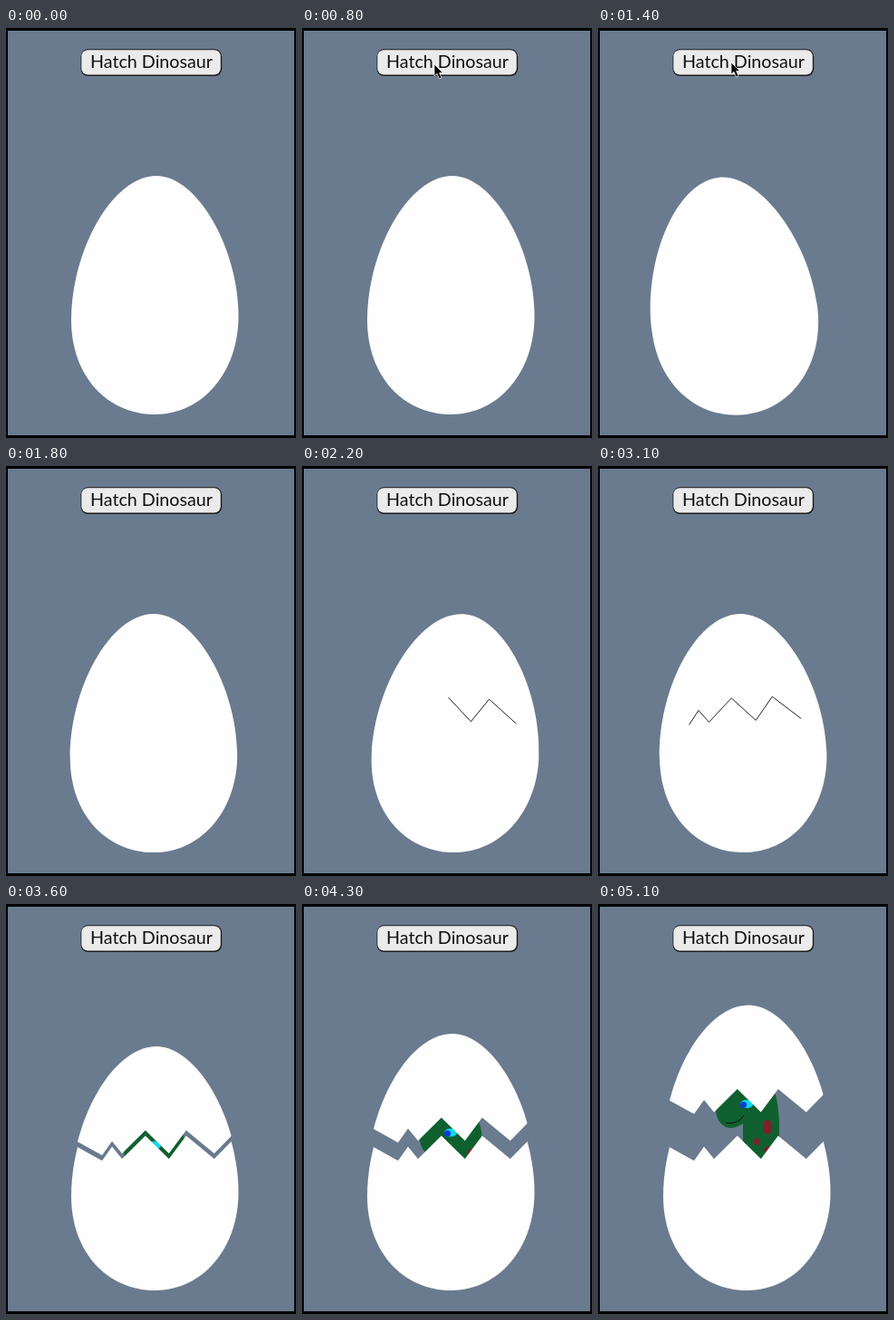
These frames come from a looping animation (320 px wide and 452 px high, 5.7 s). An HTML page:

```html
<!DOCTYPE html>
<html lang="en">
<head>
<meta charset="utf-8">
<title>Hatching egg</title>
<style>
  html, body { margin: 0; width: 100%; height: 100%; overflow: hidden; background: #000; }
  svg { display: block; width: 100%; height: 100%; }
  .label { font: 19.7px Lato, "Open Sans", sans-serif; fill: #111; text-anchor: middle; }
  .crack { fill: none; stroke: #111; stroke-width: .9; }
</style>
</head>
<body>
<svg viewBox="0 0 320 452">
  <defs>
    <path id="shell" d="M166 163C211 163 256.500 243 256.500 318C256.500 378 218 426 164 426C113 426 72 385 72 322C72 246 117 163 166 163Z"/>
    <clipPath id="upper"><path id="upperCut"/></clipPath>
    <clipPath id="lower"><path id="lowerCut"/></clipPath>
  </defs>
  <rect x="2" y="3" width="316" height="446" fill="#6a7b8f"/>

  <g id="button">
    <rect x="82.500" y="23.300" width="155.700" height="29.700" rx="8" fill="#1c1c1c"/>
    <rect x="83.300" y="24.200" width="153.500" height="27.400" rx="7" fill="#ebebeb"/>
    <text class="label" x="160.500" y="44">Hatch Dinosaur</text>
  </g>

  <g id="egg" fill="#fefefe">
    <use href="#shell"/>
    <polyline id="crack" class="crack"/>
  </g>

  <g id="hatch" fill="#fefefe">
    <g id="dino">
      <path fill="#10602f" d="M130 226C130 234 133 240 138 244C144 249 153 247 160 242L160 296L200 296L200 240C199 225 198 216 195 208C190 192 176 188 162 192C146 197 133 210 130 226Z"/>
      <path d="M141 241.500Q155 243 161 233" fill="none" stroke="#111" stroke-width="1"/>
      <ellipse cx="164" cy="220.500" rx="7" ry="4.500" fill="#08dcec"/>
      <circle cx="160.500" cy="221.500" r="3.500" fill="#1238dc"/>
      <g fill="#7c2228">
        <ellipse cx="187" cy="246" rx="5" ry="8"/>
        <ellipse cx="175" cy="262" rx="3.500" ry="4"/>
        <ellipse cx="187" cy="271" rx="3.500" ry="4"/>
      </g>
    </g>
    <use href="#shell" clip-path="url(#lower)"/>
    <g id="lid"><use href="#shell" clip-path="url(#upper)"/></g>
  </g>

  <path id="cursor" d="M0 0V13L3 10.300L5.500 16L8 15L5.600 9.500H9.500Z" fill="#000" stroke="#fff" stroke-width=".7"/>
</svg>
<script>
const LOOP = 5700, STEP = 100;
const $ = id => document.getElementById(id);

// Zigzag across the shell, at rest
const zigzag = [[106, 283], [117, 267.4], [128, 280.9], [153.8, 255.4], [179.8, 280.9], [198.8, 255.4], [229.8, 280.9]];
const cut = [[50, 252], ...zigzag, [270, 240]].map(p => p.join(" ")).join("L");
$("upperCut").setAttribute("d", `M${cut}V100H50Z`);
$("lowerCut").setAttribute("d", `M${cut}V440H50Z`);

// Each list holds one value per step, beginning at its start step
const ROCK = { start: 12, end: 33, tilt: [-1.5, -4.8, -7.3, 2.6, 3, -2.2, -0.7] };
const LIFT = {
  start: 33,
  rise: [1, 2.3, 4, 6, 8.6, 11.4, 14.2, 17, 19, 19.8, 20, 24.5, 33, 41.5, 47.5, 49.6, 50.7, 51.2, 51.5]
};
const ENTER = { start: 3, path: [[135, -8], [136, 5], [139, 18], [142, 29], [145, 37], [146, 40], [147, 38]] };
const LEAVE = { start: 15, path: [[112, 27], [24, 16]] };

const show = (el, on) => el.setAttribute("display", on ? "inline" : "none");
const shift = (el, x, y) => el.setAttribute("transform", `translate(${x} ${y})`);
const last = (list, i) => list[Math.min(i, list.length - 1)];

function cursorAt(n) {
  if (n < ENTER.start) return null;
  return n < LEAVE.start ? last(ENTER.path, n - ENTER.start) : LEAVE.path[n - LEAVE.start];
}

function drawEgg(n) {
  const rocking = n >= ROCK.start && n < ROCK.end;
  const k = n - ROCK.start, period = ROCK.tilt.length;
  const angle = rocking ? ROCK.tilt[k % period] : 0;
  const round = rocking ? Math.floor(k / period) : 0;
  $("egg").setAttribute("transform", `rotate(${angle} 164 426)`);
  const points = round === 0 ? [] : round === 1 ? zigzag.slice(3) : zigzag;
  $("crack").setAttribute("points", points.join(" "));
}

function draw(time) {
  const n = Math.floor(time % LOOP / STEP);
  const open = n >= LIFT.start;
  show($("egg"), !open);
  show($("hatch"), open);
  if (open) {
    const rise = last(LIFT.rise, n - LIFT.start);
    shift($("lid"), 0, -rise);
    shift($("dino"), 0, last(LIFT.rise, Infinity) - rise);
  } else {
    drawEgg(n);
  }
  const spot = cursorAt(n);
  show($("cursor"), spot);
  if (spot) shift($("cursor"), ...spot);
}

const begin = performance.now();
function tick() {
  draw(performance.now() - begin);
  requestAnimationFrame(tick);
}
tick();
</script>
</body>
</html>
```
